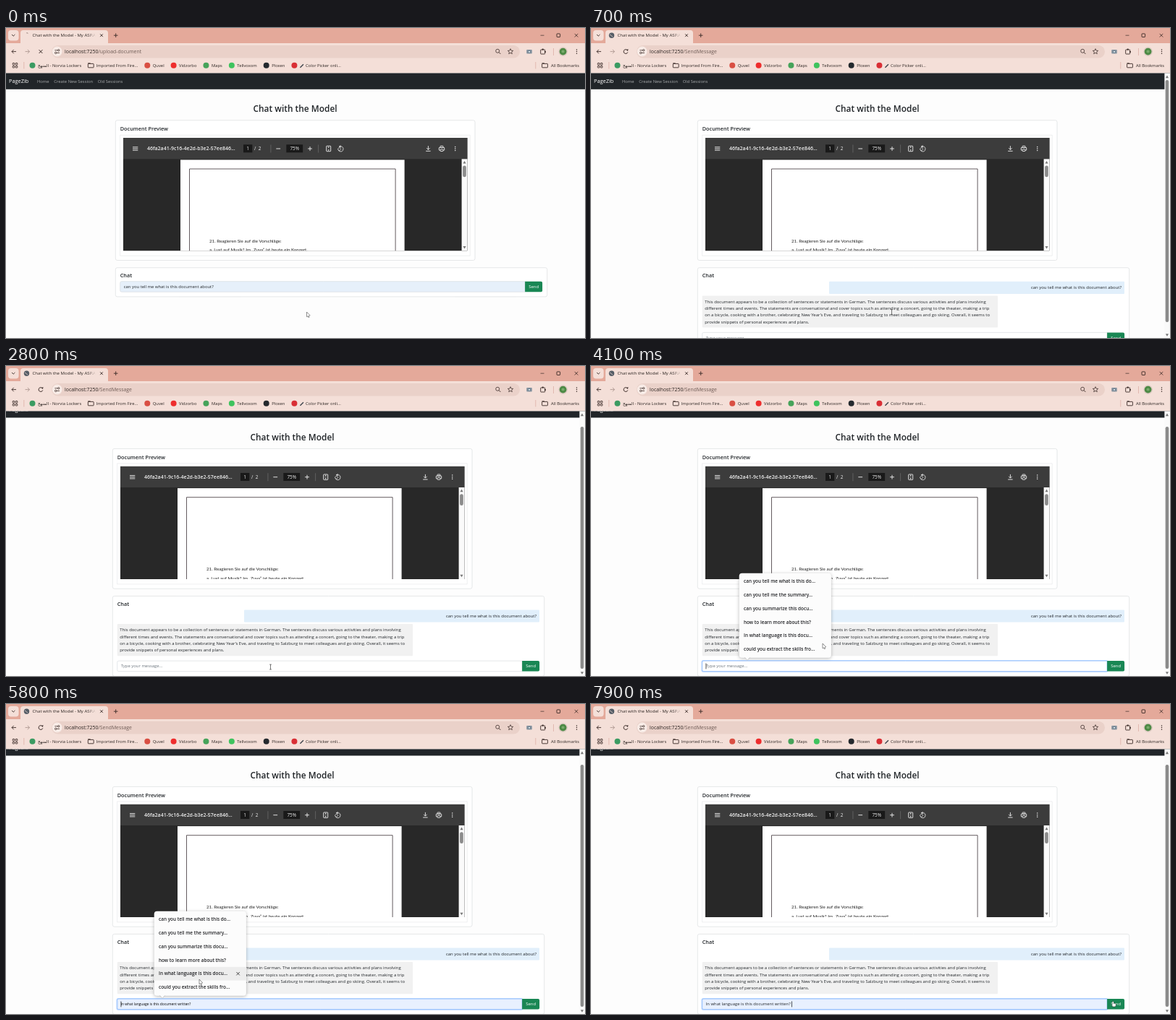
Write an HTML page with a canvas that moves like this. It is 800 px wide and 429 px high and loops after 8 s.

```html
<!DOCTYPE html>
<html lang="en">
<head>
<meta charset="utf-8">
<title>Document chat</title>
<style>
html, body { margin: 0; width: 100%; height: 100%; overflow: hidden; background: #fdfdfd; }
canvas { display: block; width: 100vw; height: 100vh; }
</style>
</head>
<body>
<canvas id="stage" width="800" height="429"></canvas>
<script>
const ctx = document.getElementById('stage').getContext('2d');
const LOOP = 8000, STEP = 100;
const LOADED = 400, SCROLLED = 900, FOCUS = 3700, HOVER = 4200, PICK = 6800;
const SANS = '"Open Sans", "Noto Sans", "DejaVu Sans", sans-serif';
const LATO = 'Lato, "Open Sans", sans-serif';
const BAR = '#f4dfd8', INK = '#3a2b28', DARK = '#212529', LIGHT = '#f1f1f1', THUMB = '#8b8b8b';
const QUESTION = 'can you tell me what is this document about?';
const PICKED = 'In what language is this document written?';
const REPLY = [
  'This document appears to be a collection of sentences or statements in German. The sentences discuss various activities and plans involving',
  'different times and events. The statements are conversational and cover topics such as attending a concert, going to the theater, making a trip',
  'on a bicycle, cooking with a brother, celebrating New Year\u2019s Eve, and traveling to Salzburg to meet colleagues and go skiing. Overall, it seems to',
  'provide snippets of personal experiences and plans.'
];
const HINTS = ['can you tell me what is this do...', 'can you tell me the summary...', 'can you summarize this docu...',
  'how to learn more about this?', 'In what language is this docu...', 'could you extract the skills fro...'];
const PREVIEWS = { 4: PICKED, 5: 'could you extract the skills from this file?' };
const HINT_TOP = 288.8, HINT_H = 18.75;

// Pointer moves, each eased from where the last one stopped
const HOME = { x: 415.5, y: 393 };
const MOVES = [
  { from: 1000, to: 1400, x: 405, y: 396 },
  { from: 1400, to: 2100, x: 386, y: 416 },
  { from: 2200, to: 2400, x: 335, y: 416 },
  { from: 2400, to: 3200, x: 396, y: 417 },
  { from: 3700, to: 4100, x: 320, y: 384 },
  { from: 4100, to: 4400, x: 300, y: 386 },
  { from: 4900, to: 5700, x: 267, y: 381 },
  { from: 6000, to: 6400, x: 266, y: 378 },
  { from: 6800, to: 7900, x: 721, y: 411.5 }
];
const clamp = u => Math.min(1, Math.max(0, u));
const ease = u => u * u * (3 - 2 * u);

function pointer(t) {
  let { x, y } = HOME;
  for (const m of MOVES) {
    const u = ease(clamp((t - m.from) / (m.to - m.from)));
    x += (m.x - x) * u;
    y += (m.y - y) * u;
  }
  return { x, y };
}

// y is the middle of the capitals; drawn large and scaled down for exact advances
function text(s, x, y, size, color, { weight = 400, align = 'left', family = SANS } = {}) {
  ctx.save();
  ctx.translate(x, y + size * 0.34);
  ctx.scale(0.1, 0.1);
  ctx.font = `${weight} ${size * 10}px ${family}`;
  ctx.textAlign = align;
  ctx.fillStyle = color;
  ctx.fillText(s, 0, 0);
  const width = ctx.measureText(s).width / 10;
  ctx.restore();
  return width;
}
function paint(fill, stroke, lw) {
  if (fill) { ctx.fillStyle = fill; ctx.fill(); }
  if (stroke) { ctx.strokeStyle = stroke; ctx.lineWidth = lw; ctx.stroke(); }
}
function rect(x, y, w, h, color) {
  ctx.fillStyle = color;
  ctx.fillRect(x, y, w, h);
}
function round(x, y, w, h, r, fill, stroke, lw = 0.6) {
  ctx.beginPath();
  ctx.roundRect(x, y, w, h, r);
  paint(fill, stroke, lw);
}
function box(x, y, w, h, color, fill) {
  round(x - w / 2, y - h / 2, w, h, 0.6, fill, color, 0.9);
}
function circle(x, y, r, fill, stroke, lw = 0.8, from = 0, to = Math.PI * 2) {
  ctx.beginPath();
  ctx.arc(x, y, r, from, to);
  paint(fill, stroke, lw);
}
function line(x1, y1, x2, y2, color, lw = 0.9) {
  ctx.beginPath();
  ctx.moveTo(x1, y1);
  ctx.lineTo(x2, y2);
  paint(null, color, lw);
}
// Regular star or polygon; inner < 1 pulls every second corner in
function star(x, y, r, corners, inner, turn, fill, stroke) {
  ctx.beginPath();
  for (let i = 0; i < corners; i++) {
    const a = turn + i * 2 * Math.PI / corners, d = i % 2 ? r * inner : r;
    ctx.lineTo(x + d * Math.cos(a), y + d * Math.sin(a));
  }
  ctx.closePath();
  paint(fill, stroke, 0.75);
}
const UP = -Math.PI / 2, DOWN = Math.PI / 2;
const tri = (x, y, r, turn, color) => star(x, y, r, 3, 1, turn, color);
// Two strokes meeting in a tip; dir is 1 for right, -1 for left
function chevron(x, y, r, dir, color) {
  for (const s of [-1, 1]) line(x, y, x - dir * r, y + s * r, color);
}
function vee(x, y, r, color) {
  for (const s of [-1, 1]) line(x, y, x + s * r, y - r, color);
}
function arrow(x, y, dir, color) {
  line(x - 3 * dir, y, x + 3 * dir, y, color);
  chevron(x + 3 * dir, y, 2.7, dir, color);
}
function cross(x, y, r, color, lw = 0.9) {
  for (const s of [-1, 1]) line(x - r, y - s * r, x + r, y + s * r, color, lw);
}
function plus(x, y, r, color) {
  line(x - r, y, x + r, y, color);
  line(x, y - r, x, y + r, color);
}
function dots(x, y, color) {
  for (let i = -1; i < 2; i++) circle(x, y + i * 2.6, 0.75, color);
}
function folder(x, y) {
  box(x, y + 0.4, 7.8, 5.4, INK);
  line(x - 4, y - 2.9, x - 0.6, y - 2.9, INK);
}
function clipTo(x, y, w, h) {
  ctx.beginPath();
  ctx.rect(x, y, w, h);
  ctx.clip();
}

function tabStrip(t) {
  const y = 10.2;
  rect(0, 0, 800, 22, '#e4a99a');
  round(3, 3, 14.5, 14.5, 4, BAR);
  vee(10.2, y + 1, 2.2, INK);
  round(20, 3, 121, 24, 4, BAR);
  if (t < LOADED) {
    const a = t / 160 - 1.6;
    circle(28.5, y, 3.4, null, '#6d5650', 0.8, a, a + 0.6);
  } else {
    circle(28.5, y, 3.7, '#555d66');
    line(26, y - 1.3, 30, y + 2, '#f0dcd7', 0.8);
  }
  ctx.save();
  clipTo(36, 3, 88, 16);
  text('Chat with the Model - My ASP.APP', 36.5, y, 6.05, '#2b2320');
  ctx.restore();
  const fade = ctx.createLinearGradient(113, 0, 124, 0);
  fade.addColorStop(0, BAR + '00');
  fade.addColorStop(1, BAR);
  rect(113, 4, 12, 14, fade);
  cross(132, y, 1.9, INK);
  plus(151.7, y, 2.8, INK);
  line(738.5, y, 743.5, y, INK, 0.7);
  box(763.3, y, 4.6, 4.6, INK);
  cross(788, y, 2.3, INK, 0.8);
}

function addressBar(t) {
  const y = 32.6, fresh = t < LOADED;
  rect(0, 21, 800, 41.7, BAR);
  arrow(11, y, -1, INK);
  arrow(29.5, y, 1, '#ad9790');
  if (fresh) cross(48, y, 2.4, INK, 1);
  else {
    circle(48, y, 2.9, null, INK, 0.95, 0.3, 5.7);
    tri(50.4, y - 2.2, 1.7, UP / 2, INK);
  }
  round(63, 24, 647, 17.5, 8.7, '#ead1c9');
  circle(70.7, y, 7, '#f8ebe6');
  for (const s of [-1, 1]) {
    line(70.7 - 3.3, y + s * 1.8, 70.7 + 3.3, y + s * 1.8, INK, 0.8);
    circle(70.7 - s * 2, y + s * 1.8, 1.2, '#f8ebe6', INK);
  }
  const w = text('localhost:7250', 81, y, 6.87, '#2b2320');
  text(fresh ? '/upload-document' : '/SendMessage', 81 + w, y, 6.87, '#6e5b55');

  circle(679.2, y - 0.8, 2.5, null, INK);
  line(681, y + 1, 683.4, y + 3.4, INK);
  star(697, y, 3.9, 10, 0.45, UP, null, INK);
  round(719.2, y - 2.6, 7.6, 5.6, 1, '#8794a0');
  circle(723, y + 0.2, 1.6, '#dbe8ee', '#40576a', 0.6);
  box(741.7, y + 0.4, 6, 6, INK);
  circle(741.7, y - 3, 1.1, INK);
  circle(745, y + 0.4, 1.1, INK);
  rect(756, 28, 0.7, 10, '#d9aaa0');
  circle(769.6, y, 5.6, '#4d8a45', '#dccac2', 1.4);
  circle(769.6, y, 2, '#79ab6c');
  dots(788.5, y, INK);
}

function bookmarks() {
  const y = 51.7, size = 5.85;
  for (let i = 0; i < 4; i++) box(10.5 + 4 * (i % 2), y - 2 + 4 * (i >> 1), 2.6, 2.6, INK);
  for (const x of [24.5, 731.5]) rect(x, 47, 0.7, 9.5, '#d9aaa0');
  const marks = [['المنهج - Norvia Lockers', '#3b9b62'], ['Imported From Fire...'], ['Quvel', '#d94f43'], ['Vidzorbo', '#ee2d2d'],
    ['Maps', '#46a35a'], ['Tellvoxom', '#3fc35e'], ['Ploxen', '#24292e'], ['Color Picker onli...', '#d92f35']];
  let x = 36.5;
  for (const [name, color] of marks) {
    if (color) circle(x, y, 4, color);
    else folder(x, y);
    if (name.startsWith('Color')) {
      x += 8;
      line(x, y + 3, x + 4.5, y - 1.5, '#394149', 1.3);
    }
    x += 7.5;
    x += text(name, x, y, size, '#2b2320') + 13;
  }
  folder(744.5, y);
  text('All Bookmarks', 753, y, size, '#2b2320');
}

function viewerBar() {
  const W = LIGHT, y = 167;
  rect(162, 152, 476, 29.3, '#3c3c3c');
  for (let i = -1; i < 2; i++) line(175, y + i * 2.2, 182.3, y + i * 2.2, W);
  text('46fa2a41-9c16-4e2d-b3e2-57ee846...', 195, y, 7, W, { weight: 600 });
  rect(328, y - 5.7, 12.3, 11, '#191919');
  text('1', 334.2, y, 6.4, W, { align: 'center' });
  text('/  2', 343, y, 6.4, W);
  for (const x of [365.9, 431.6]) line(x, y - 5.5, x, y + 5.5, '#777', 0.6);
  line(373.3, y, 379.1, y, W);
  rect(387.3, y - 5.7, 22.8, 11, '#191919');
  text('75%', 398.7, y, 6.4, W, { align: 'center' });
  plus(420, y, 2.9, W);
  box(445.7, y, 6, 7.4, W);
  tri(445.7, y - 1.8, 1.3, UP, W);
  tri(445.7, y + 1.8, 1.3, DOWN, W);
  circle(462.4, y + 0.4, 3.5, null, W, 0.8, -1.4, 2.8);
  tri(461.6, y - 3, 1.9, Math.PI, W);
  star(460.5, y + 0.6, 2.3, 4, 1, 0, null, W);
  line(583.4, y - 3.8, 583.4, y + 1.2, W);
  vee(583.4, y + 1.4, 2.2, W);
  line(580.2, y + 3.3, 586.6, y + 3.3, W);
  box(602, y - 2.6, 4, 2.2, W);
  box(602, y + 0.3, 7.4, 3.8, W);
  box(602, y + 2.2, 4, 2.7, W, '#3c3c3c');
  dots(620.7, y, W);
}

function viewer() {
  round(151.3, 127.7, 496.7, 193.8, 2.5, '#fff', '#d6d8da');
  text('Document Preview', 157.7, 139.4, 7.32, DARK, { weight: 600 });
  round(157.6, 148.2, 483.6, 167, 0, null, '#e2e4e6');
  ctx.save();
  clipTo(162, 152, 475.4, 156.3);
  rect(162, 152, 476, 157, '#282828');
  viewerBar();
  rect(241, 182.4, 309.6, 130, '#fff');
  round(253.5, 195, 284.6, 130, 0, null, '#3d3338', 0.8);
  ['21. Reagieren Sie auf die Vorschläge:', 'a. Lust auf Musik? Im „Zuva” ist heute ein Konzert.']
    .forEach((s, i) => text(s, 281, 294.6 + 12.3 * i, 6.2, '#222', { family: LATO }));
  rect(629.6, 181.3, 8, 127, '#fafafa');
  tri(633.5, 186.3, 2.4, UP, '#777');
  tri(633.5, 303.2, 2.4, DOWN, '#777');
  round(631.1, 190.5, 4.7, 15.8, 2.3, THUMB);
  ctx.restore();
}

function inputRow(y, s, color, { fill = '#fff', focused = false, size = 5.9 } = {}) {
  const x = 157.7, w = 559.4, h = 14.5;
  if (focused) round(x - 1.2, y - 1.2, w + 2.4, h + 2.4, 2.5, '#b9d6fe');
  round(x, y, w, h, [2, 0, 0, 2], fill, focused ? '#86b7fe' : '#d9dde1', 0.7);
  text(s, x + 5, y + h / 2, size, color);
  round(x + w, y, 24, h, [0, 2, 2, 0], '#198754');
  text('Send', x + w + 12, y + h / 2, 5.95, '#fff', { align: 'center' });
}

function chat(t, row) {
  const fresh = t < LOADED;
  round(151.3, 331.7, 596.4, fresh ? 40.2 : 111, 2.5, '#fff', '#d6d8da');
  text('Chat', 157.7, 342.7, 7.32, DARK, { weight: 600 });
  if (fresh) return inputRow(350.7, QUESTION, DARK, { fill: '#e6f0fa' });

  round(333, 350.7, 408, 17.2, 1, '#e1effb');
  text(QUESTION, 737, 359.3, 5.95, DARK, { align: 'right' });
  round(157.7, 370.4, 408.3, 44.2, 1, LIGHT);
  REPLY.forEach((s, i) => text(s, 161.3, 378.6 + 9.33 * i, 5.95, DARK));

  const focused = t >= FOCUS, picked = t >= PICK, y = 421.4;
  if (picked) inputRow(y, PICKED, DARK, { fill: '#e8f0fe', focused, size: 5.87 });
  else if (row in PREVIEWS) inputRow(y, PREVIEWS[row], '#000', { fill: '#e8f0fe', focused, size: 4.85 });
  else inputRow(y, 'Type your message...', '#6c757d', { focused });
  const blink = Math.floor((t - (picked ? PICK : FOCUS)) / 500) % 2 === 0;
  if (focused && blink) rect(picked ? 281.3 : 162.6, y + 3.3, 0.7, 8, '#111');
}

function page(t, row) {
  const fresh = t < LOADED;
  const scroll = 13.3 * clamp((t - SCROLLED) / 200 + 1);
  ctx.save();
  clipTo(0, 62.5, 800, 367);
  rect(0, 62, 800, 367, '#fdfdfd');
  ctx.translate(0, -scroll);
  rect(0, 62, 800, 22.8, DARK);
  text('PageZib', 4, 73.8, 7.4, '#fff');
  let x = 43;
  for (const s of ['Home', 'Create New Session', 'Old Sessions']) x += text(s, x, 73.8, 5.87, '#a9abad') + 6.6;
  ctx.translate(fresh ? 0 : -4, 0);
  text('Chat with the Model', 399.5, 112.1, 11.9, DARK, { weight: 600, align: 'center' });
  viewer();
  chat(t, row);
  ctx.restore();
  if (fresh) return;
  rect(792.4, 62.5, 7.6, 367, '#fafafa');
  tri(796, 68, 2.4, UP, '#777');
  tri(796, 424.4, 2.4, DOWN, '#777');
  round(793.7, 72 + scroll * 0.9, 4.6, 335, 2.3, THUMB);
}

function suggestions(row) {
  const x = 204.7, w = 127.2;
  ctx.save();
  ctx.shadowColor = 'rgba(0,0,0,.28)';
  ctx.shadowBlur = 4;
  ctx.shadowOffsetY = 1;
  round(x, 286.7, w, 117, 4, '#fcfcfc');
  ctx.restore();
  tri(216, 403, 4.4, DOWN, '#fcfcfc');
  vee(216, 407.3, 3.8, '#c9c9c9');
  HINTS.forEach((s, i) => {
    const y = HINT_TOP + HINT_H * (i + 0.5);
    if (i === row) {
      rect(x, y - HINT_H / 2, w, HINT_H, '#ededed');
      cross(320.6, y, 2.2, '#333');
    }
    text(s, x + 6.3, y, 6.42, '#202124', { weight: 600 });
  });
}

function drawPointer(t, { x, y }) {
  const overText = (t >= LOADED && t < SCROLLED) || (t < 3800 && y > 407);
  ctx.lineJoin = 'round';
  if (overText) {
    line(x, y - 3.4, x, y + 3.4, '#555', 0.8);
    for (const s of [-3.4, 3.4]) line(x - 1.4, y + s, x + 1.4, y + s, '#555', 0.8);
  } else if (x > 714) {
    round(x - 0.6, y, 1.7, 5, 0.8, '#fff', '#25352c');
    round(x - 1, y + 2.8, 5.2, 4.6, 1.4, '#fff', '#25352c');
    round(x - 0.3, y + 0.6, 1.1, 4, 0.5, '#fff');
  } else {
    line(x + 1.6, y + 4, x + 3.2, y + 7.5, '#444', 1.8);
    ctx.beginPath();
    ctx.moveTo(x, y);
    ctx.lineTo(x, y + 6.6);
    ctx.lineTo(x + 4.6, y + 4.7);
    ctx.closePath();
    paint('#fff', '#444', 0.6);
    line(x + 1.6, y + 4, x + 3.1, y + 7.2, '#fff', 0.8);
  }
}

function draw(t) {
  const tip = pointer(t);
  const open = t > FOCUS && t < PICK;
  const row = open && t >= HOVER ? Math.floor((tip.y - HINT_TOP) / HINT_H) : -1;
  tabStrip(t);
  addressBar(t);
  bookmarks();
  page(t, row);
  if (open) suggestions(row);
  drawPointer(t, tip);
}

const start = performance.now();
function frame() {
  const t = (performance.now() - start) % LOOP;
  draw(Math.floor(t / STEP) * STEP);
  requestAnimationFrame(frame);
}
frame();
</script>
</body>
</html>
```
